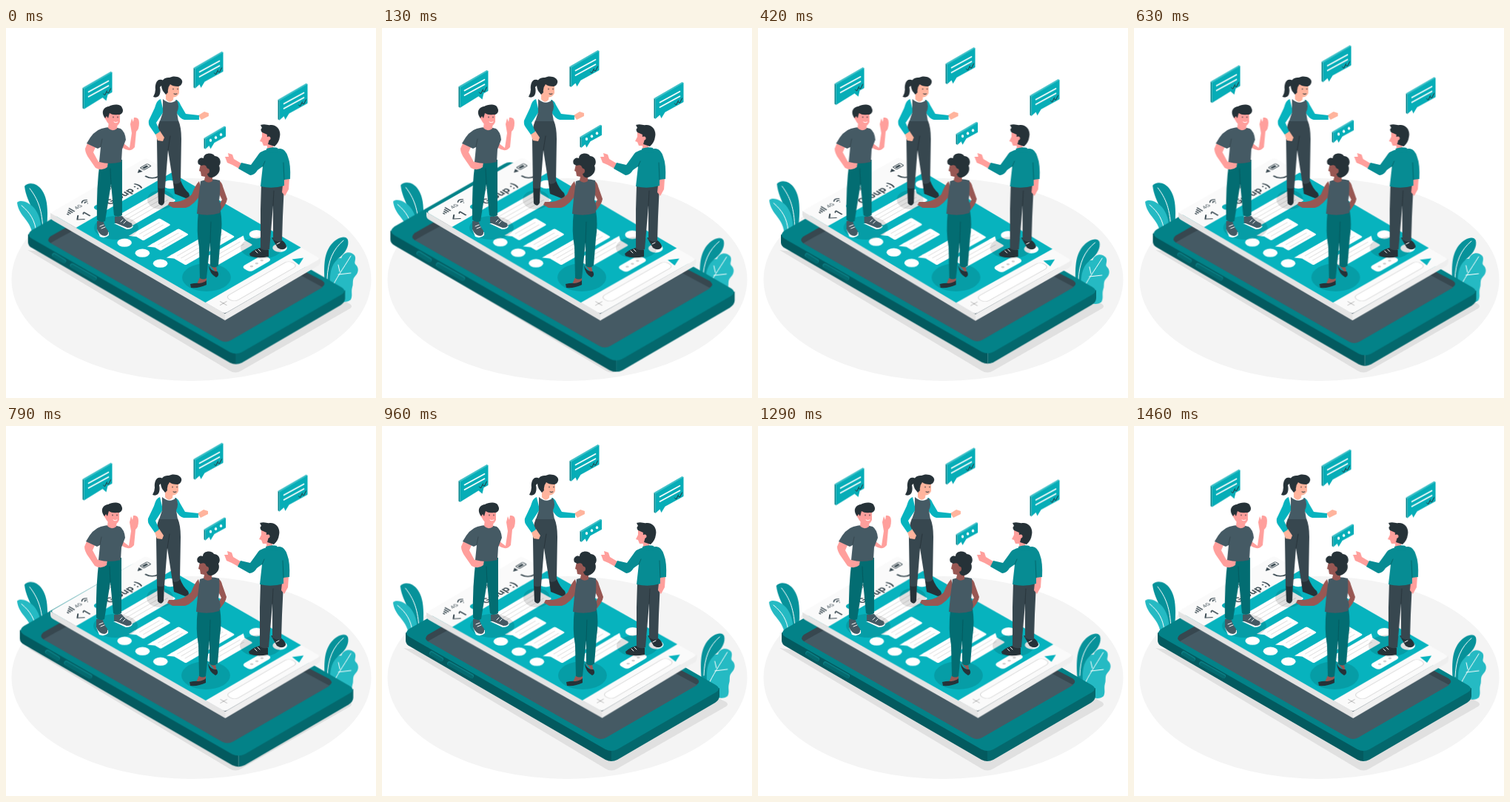
An HTML page for the animation above (1.5 s loop, 500 px wide and 500 px high).

```html
<!DOCTYPE html>
<html lang="en">
<head>
<meta charset="utf-8">
<title>Group chat</title>
<style>
  html, body { margin: 0; width: 100%; height: 100%; overflow: hidden; background: #fff; }
  svg { display: block; width: 100vw; height: 100vh; }
  .wind { transform-origin: 250px 250px; }
  .beat { transform-origin: 244px 334px; }
  .teal { fill: #07b3be; }
  .mid { fill: #06adb7; }
  .deep { fill: #038288; }
  .sweater { fill: #078c93; }
  .pants { fill: #036d72; }
  .leaf { fill: #07929a; }
  .leaf2 { fill: #25bac3; }
  .slate { fill: #455a64; }
  .coal { fill: #37474f; }
  .ink { fill: #263238; }
  .pink { fill: #ff9f9c; }
  .peach { fill: #ffb49d; }
  .brown { fill: #985753; }
  .white { fill: #fff; }
  .line { fill: none; stroke-linecap: round; stroke-linejoin: round; }
  .shade { fill: #000; opacity: .12; }
  text { font-family: Inter, "Open Sans", sans-serif; fill: #37474f; }
</style>
</head>
<body>
<svg viewBox="0 0 500 500">
  <ellipse cx="250.500" cy="340" rx="243" ry="137" fill="#f4f4f4"/>
  <path fill="#e0e0e0" d="M29 300 L302 463 Q310 468 318 463 L465 379 Q469 376 465 373 L420 350 Z"/>

  <g class="wind">
    <path class="leaf" d="M25 214 C30 208 42 209 49 220 C56 231 58 246 54 280 L45 280 C48 256 28 240 25 214Z"/>
    <path class="line" stroke="#fff" d="M32 217 C43 231 49 246 50 274"/>
    <path class="leaf2" d="M15 236 C20 231 33 236 40 246 C46 255 48 265 48 284 L36 284 C36 260 17 256 15 236Z"/>
    <path class="line" stroke="#fff" d="M21 240 C33 250 39 260 41 276"/>
    <path class="leaf2" d="M431 352 C439 342 436 331 440 322 C444 313 449 310 453 311 C456 302 466 301 471 307 C474 312 470 316 472 319 C477 323 477 330 472 335 C467 340 470 345 468 350 C466 357 469 361 466 367 C458 374 440 368 431 352Z"/>
    <path class="line" stroke="#fff" d="M466 308 C455 326 446 338 439 354 M451 329 L449 320 M449 333 L466 331"/>
    <path class="leaf" d="M431 348 C429 320 430 305 439 293 C447 283 459 279 462 286 C464 294 459 303 452 309 C443 316 437 324 438 346Z"/>
    <path class="line" stroke="#fff" d="M456 287 C442 299 435 314 434 339"/>
  </g>

  <g class="beat">
    <path fill="#035a5f" d="M32 279 V290 Q32 295 38 298 L302 451 Q306 453 310 453 V430Z"/>
    <path fill="#04686d" d="M456 354 V365 Q456 370 450 374 L318 451 Q314 453 310 453 V430Z"/>
    <path class="deep" d="M37 274 L172 197 Q179 193 186 197 L451 350 Q459 355 451 360 L318 437 Q310 441 302 437 L37 285 Q29 280 37 274Z"/>
    <path class="coal" d="M62 282 L182 214 L425 341 Q431 345 426 349 L412 356 L75 294 L62 291 Q56 287 62 282Z"/>
    <path class="slate" d="M62 291 L76 283 L190 222 L411 342 L426 350 L303 421 Q296 425 289 421 Z"/>
    <path class="line" stroke="#0a7b81" stroke-width="6" d="M67 307 L80 315 M91 321 L121 338"/>
    <path class="line" stroke="#046a6f" stroke-width="4" d="M67 308 L80 316 M91 322 L121 339"/>
  </g>

  <g class="wind">
    <path fill="#e4e4e4" d="M60 250 L296 386 V395 L63 260 Q60 258 60 255Z"/>
    <path fill="#eee" d="M296 386 L425 311 V316 Q425 319 422 321 L296 395Z"/>
    <g id="card" transform="matrix(.866 -.5 .866 .5 60 250)">
      <rect width="149" height="272" rx="4" fill="#fafafa"/>
      <rect y="40" width="149" height="202" class="teal"/>
      <path class="coal" d="M11 17v-3h1.700v3z M14 17v-5h1.700v5z M17 17v-7h1.700v7z M20 17v-9h1.700v9z"/>
      <text x="25" y="16" font-size="7">4G</text>
      <path class="line" stroke="#37474f" stroke-width="1.300" d="M38 11q4-4 8 0M40 13.500q2-2 4 0M42 16v.1"/>
      <text x="73" y="16" font-size="8" font-weight="600">9:45</text>
      <path class="coal" d="M122 14l6-4v6z"/>
      <rect x="131" y="9" width="11" height="6" rx="1" fill="none" stroke="#37474f"/>
      <path class="coal" d="M132.500 10.500h7v3h-7z"/>
      <path class="line" stroke="#37474f" stroke-width="1.600" d="M18 25l-6 5 6 5"/>
      <text x="23" y="35" font-size="14" font-weight="600">1</text>
      <circle cx="45" cy="30" r="5" class="mid"/>
      <text x="57" y="36" font-size="13" font-weight="700">Group :)</text>
      <path class="line" stroke="#37474f" stroke-width="2.400" d="M124 25c0 6 4 10 10 10"/>
      <rect x="23" y="250" width="99" height="14" rx="6" fill="#fff" stroke="#d8d8d8"/>
      <path class="line" stroke="#bdbdbd" d="M8 257h10M13 252v10"/>
      <path class="teal" d="M126 251l11 7-13 6z"/>
    </g>
  </g>

  <g class="shake">
    <ellipse class="shade" cx="209" cy="232" rx="18" ry="13"/>
    <path class="ink" d="M205 212 H215 L214 236 Q211 243 206 237Z M226 210 L236 206 Q240 217 247 223 Q250 229 243 230 L228 224Z"/>
    <path class="coal" d="M208 125 Q203 137 204 153 L205 216 Q210 218 215 216 L219 165 L226 210 Q232 212 236 208 L237 150 Q237 134 233 125Z"/>
    <path class="line" stroke="#263238" stroke-width=".8" d="M219 165L222 146"/>
    <path class="peach" d="M201 141 L208 139 L214 148 L212 153 L205 152Z M260 118 L268 113 L274 115 L274 119 L264 124Z"/>
    <path class="teal" d="M209 96 Q204 97 201 108 L193 125 Q192 130 195 134 L202 144 L208 140 L203 128 L213 113Z M229 97 Q234 98 236 104 L243 116 L261 118 V124 L241 124 Q235 123 229 112Z"/>
    <path class="slate" d="M212 96 Q222 105 231 97 Q235 106 231 114 L233 126 H208 L212 114Z"/>
    <path class="peach" d="M216 86 L227 88 L226 97 Q221 103 216 96Z"/>
    <path class="peach" d="M216 75 Q227 69 234 77 L234 88 Q231 95 224 93 Q216 91 215 82Z"/>
    <path class="ink" d="M213 71 C204 66 201 76 202 83 Q202 88 199 93 C207 96 210 88 208 80 Q211 76 213 78Z"/>
    <path class="ink" d="M212 85 C207 74 212 66 221 67 C228 63 240 67 238 74 Q237 78 233 79 Q225 79 222 76 Q218 81 219 87 L216 90Z"/>
    <path class="line" stroke="#263238" d="M226 82v1M232 82v1M227 89q2 1 4 0"/>
  </g>

  <g class="shake">
    <ellipse class="shade" cx="149" cy="270" rx="30" ry="16"/>
    <path class="white" d="M123 272 L127 282 Q134 285 139 280 V276Z M146 264 L163 272 Q170 272 172 268 L167 264Z"/>
    <path class="slate" d="M123 261 L131 259 Q133 268 138 274 Q139 280 134 281 Q127 281 123 272Z M147 255 L157 254 Q162 261 170 264 Q173 270 164 270 L147 263Z"/>
    <path class="line" stroke="#fff" d="M127 268l5-2M129 271l5-2M155 262l3-3M159 264l3-3"/>
    <path class="pants" d="M127 180 Q122 215 123 259 Q128 264 134 261 L142 211 L146 253 Q151 257 157 253 L157 178Z"/>
    <path class="line" stroke="#035a5f" d="M142 211L141 190"/>
    <path class="pink" d="M110 156 L107 163 Q107 169 112 176 L121 189 Q130 194 137 188 L138 181 L131 178 L125 181 L118 168 L121 161Z"/>
    <path class="pink" d="M155 153 L167 162 L170 142 L168 130 L170 122 L172 127 L173 121 Q180 120 180 128 Q180 137 176 140 L174 161 Q168 169 158 162Z"/>
    <path class="slate" d="M129 136 Q142 132 155 136 Q161 140 162 151 L157 164 L156 181 Q140 185 126 181 L128 161 L124 163 L109 156 Q118 139 129 136Z"/>
    <path class="line" stroke="#37474f" d="M128 160l2-10"/>
    <path class="pink" d="M139 126 H151 L150 136 Q143 141 138 135Z"/>
    <path class="pink" d="M136 115 H154 V127 Q151 134 145 133 Q138 131 135 124 Q132 121 134 118Z"/>
    <path class="ink" d="M134 122 C128 115 131 107 139 106 C144 103 155 102 157 108 C160 113 156 118 151 117 Q144 118 140 115 L138 122 L136 119Z"/>
    <path class="line" stroke="#263238" d="M145 120v1M151 120v1"/>
    <path class="line" stroke="#fff" d="M146 127q2 2 5 0"/>
  </g>

  <g class="shake">
    <ellipse class="shade" cx="345" cy="297" rx="28" ry="15"/>
    <path class="ink" d="M359 283 L372 286 Q379 291 379 296 Q375 302 367 297Z M329 305 Q335 299 344 297 L355 300 V309 Q340 312 330 308Z"/>
    <path class="line" stroke="#fff" d="M337 301l3 3M341 299l3 3M366 292l4-2"/>
    <path class="coal" d="M345 212 H376 L374 255 L373 288 Q367 290 361 286 L361 240 L356 299 Q350 302 344 298 L344 245Z"/>
    <path class="line" stroke="#263238" stroke-width=".8" d="M361 240L362 220"/>
    <path class="pink" d="M318 183 L308 177 L306 171 L300 169 L301 174 L296 174 L299 182 L306 185 L315 190Z M375 203 L383 203 L382 218 L377 227 L373 222Z"/>
    <path class="sweater" d="M354 164 Q343 166 339 174 L331 185 L318 182 L314 190 L330 199 Q336 199 340 192 L347 187 L344 214 Q360 218 376 213 L376 205 L384 204 Q385 184 381 174 Q378 164 371 163Z"/>
    <path class="line" stroke="#04686d" d="M347 187l3-7M376 205l-1-23"/>
    <path class="pink" d="M346 141 H361 V163 Q357 166 353 163 V159 H348 L346 154 L343 153 L346 147Z"/>
    <path class="sweater" d="M352 163 Q360 160 367 162 L368 168 Q359 169 352 167Z"/>
    <path class="ink" d="M344 131 C351 129 354 132 357 131 C366 130 372 138 370 147 Q369 155 363 160 L354 157 L356 150 Q352 148 353 144 L346 141 Q343 137 346 135Z"/>
    <circle class="pink" cx="355" cy="149" r="2.500"/>
  </g>

  <g class="shake">
    <ellipse class="shade" cx="271" cy="337" rx="33" ry="19"/>
    <path class="brown" d="M262 337 H271 V343 L258 346Z M275 320 L284 322 L286 333Z"/>
    <path class="ink" d="M249 346 Q257 344 261 345 Q268 344 271 341 V347 Q261 352 250 351Z M274 321 Q278 330 286 329 Q289 335 284 337 Q275 332 274 321Z"/>
    <path class="pants" d="M260 248 Q257 275 261 296 L262 338 Q267 341 271 338 L276 290 L276 321 Q281 326 287 321 L290 284 Q293 265 290 247Z"/>
    <path class="line" stroke="#035a5f" d="M276 290L277 262"/>
    <path class="brown" d="M261 207 Q256 212 251 225 Q241 234 230 235 L221 235 L219 239 L226 243 L243 243 Q254 240 265 222Z M288 206 Q292 209 293 214 L299 231 Q298 239 287 250 L284 246 L292 232 L286 220Z"/>
    <path class="slate" d="M263 207 Q276 202 289 206 Q290 222 288 233 Q293 242 289 250 Q274 255 258 251 L260 230Z"/>
    <path class="brown" d="M263 184 H279 V207 Q273 211 268 206 L269 201 L264 200 L263 194 L261 193Z"/>
    <path class="ink" d="M260 184 C257 177 264 174 267 176 C267 168 280 168 282 173 C289 173 292 181 288 186 C291 193 286 200 279 202 Q273 203 272 197 Q275 192 271 188 Q270 184 264 186Z"/>
    <path class="brown" d="M270 190q5-1 5 3t-4 4z"/>
  </g>

  <g id="bubbles" class="float"></g>
</svg>
<script>
const NS = 'http://www.w3.org/2000/svg';
const $ = id => document.getElementById(id);

function add(parent, tag, attrs) {
  const el = document.createElementNS(NS, tag);
  for (const k in attrs) el.setAttribute(k, attrs[k]);
  return parent.appendChild(el);
}

// Messages lying on the card: x, y, width, height, tail side
const card = $('card');
function message(x, y, w, h, right) {
  add(card, 'rect', { x, y, width: w, height: h, rx: 2, class: 'white' });
  const edge = right ? x + w : x, dir = right ? 5 : -5;
  add(card, 'path', { class: 'white', d: `M${edge + dir} ${y}H${edge - dir}L${edge} ${y + 7}Z` });
  for (let v = y + 6; v < y + h - 3; v += 6)
    add(card, 'path', { class: 'line', stroke: '#dcdcdc', d: `M${x + 6} ${v}h${w - 12}` });
}
message(45, 56, 70, 25, true);
message(35, 92, 43, 18);
message(35, 121, 44, 16);
message(35, 151, 77, 25);
message(55, 181, 60, 20, true);

const avatar = (cx, cy) => add(card, 'circle', { cx, cy, r: 8, class: 'white' });
[98, 126, 154].forEach(v => avatar(17.6, v));
[55, 189.5, 226].forEach(v => avatar(132, v));

add(card, 'rect', { x: 76, y: 222, width: 34, height: 14, rx: 5, class: 'white' });
[85, 93, 101].forEach(cx => add(card, 'circle', { cx, cy: 229, r: 1.8, fill: '#d0d0d0' }));

// Floating bubbles: left x, left top y, width, height, tail x
function bubble(x, y, w, h, tail, typing) {
  const slope = -.55, g = add($('bubbles'), 'g', { transform: `translate(${x} ${y})` });
  const rise = w * slope, low = u => h + u * slope;
  add(g, 'path', { fill: '#04868e', d: `M0 0L2 1.200V${h + .8}L0 ${h - .6}Z` });
  add(g, 'path', { fill: '#3dbfc7', d: `M0 0L${w - 2} ${rise}L${w} ${rise + 1}L2 1.500Z` });
  add(g, 'path', {
    class: 'mid',
    d: `M2 1.200L${w} ${rise + .8}V${low(w)}L${tail + 4} ${low(tail + 4)}L${tail + (tail > w / 2 ? 2 : -1)} ${low(tail) + 6}L${tail - 3} ${low(tail - 3)}L2 ${h + .8}Z`
  });
  if (typing) {
    [9, 16, 23].forEach(u => add(g, 'ellipse', { cx: u, cy: h / 2 + u * slope + 1, rx: 1.7, ry: 2, class: 'white' }));
    return;
  }
  const stroke = (a, b, v) => add(g, 'path', {
    class: 'line', stroke: '#fff', 'stroke-width': 1.7,
    d: `M${a} ${v + a * slope}L${b} ${v + b * slope}`
  });
  stroke(8, 35, 10);
  stroke(8, 35, 16.5);
  add(g, 'path', { class: 'line', stroke: '#263238', d: `M28 ${h - 20}l2 2 3-6M33 ${h - 22}l2 1 3-6` });
}
bubble(103.5, 81, 40, 28, 30);
bubble(253.5, 54, 40, 27, 11);
bubble(367.5, 97, 40, 27, 11);
bubble(267.5, 149, 29.5, 14, 10, true);

// Each motion: [offset, value] steps and how a value becomes a transform
const motions = {
  float: [[[0, 0], [.5, -10], [1, 0]], v => `translateY(${v}px)`],
  wind: [[[0, 0], [.25, 1], [.75, -1], [1, 0]], v => `rotate(${v}deg)`],
  beat: [[[0, 1], [.1, 1.1], [.3, 1], [.4, 1], [.5, 1.1], [.6, 1], [1, 1]], v => `scale(${v})`],
  shake: [[0, -1, 2, -4, 4, -4, 4, -4, 2, -1, 0].map((v, i) => [i / 10, v]), v => `translateX(${v}px)`]
};
for (const [name, [steps, css]] of Object.entries(motions)) {
  const frames = steps.map(([offset, v]) => ({ offset, transform: css(v) }));
  document.querySelectorAll('.' + name).forEach(el =>
    el.animate(frames, { duration: 1500, delay: -15, iterations: Infinity }));
}
</script>
</body>
</html>
```
